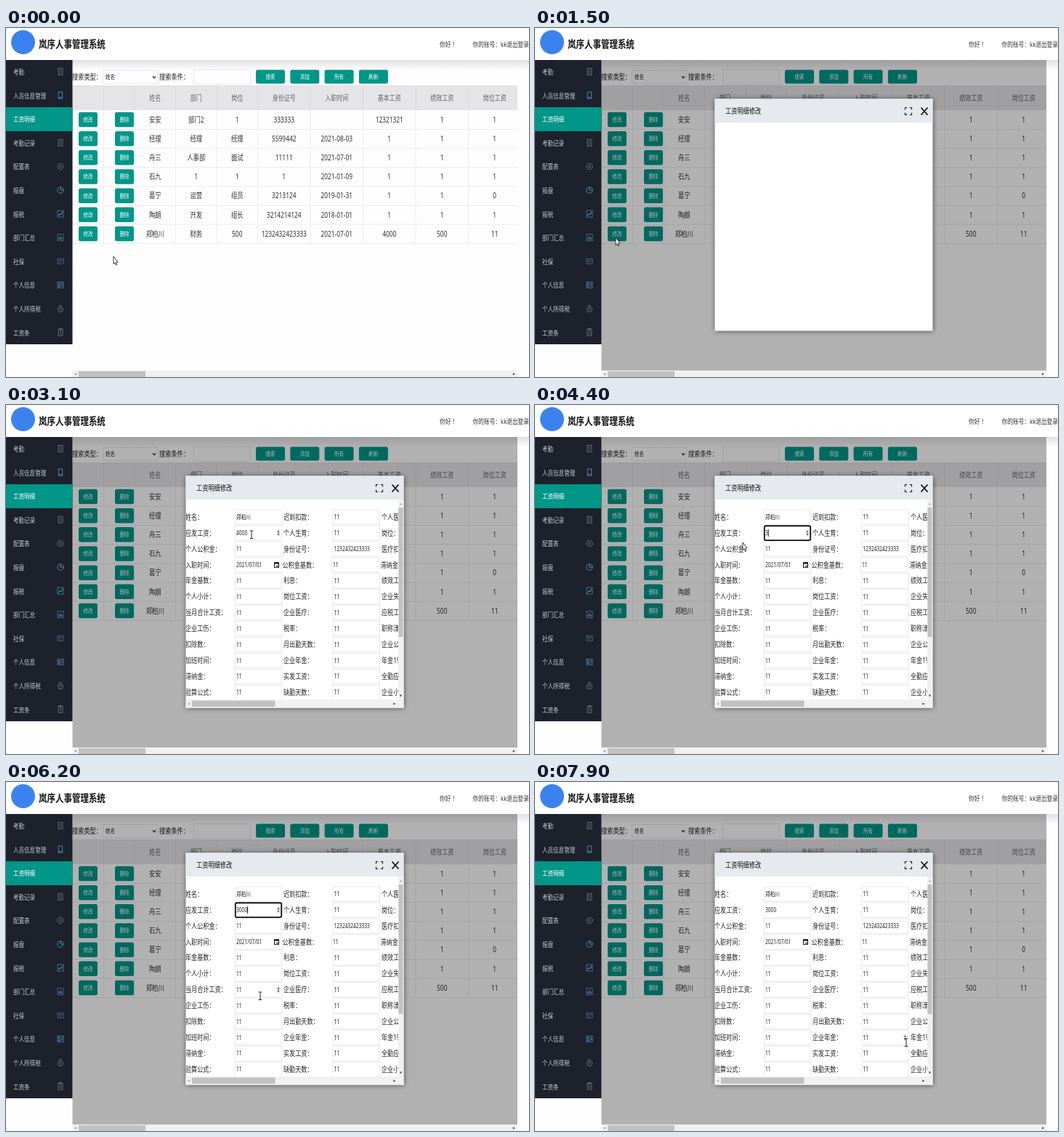
Animation, 720 px wide and 480 px high, one loop 8 s. Source, as an HTML page with a canvas:

```html
<!DOCTYPE html>
<html lang="zh-CN">
<head>
<meta charset="utf-8">
<title>人事管理</title>
<style>
html, body { margin: 0; width: 100%; height: 100%; overflow: hidden; background: #fff; }
canvas { display: block; width: 720px; height: 480px; }
</style>
</head>
<body>
<canvas id="stage" width="720" height="480"></canvas>
<script>
const ctx = document.getElementById('stage').getContext('2d');
const LOOP = 8000, STEP = 100;
const SQUEEZE = 0.82;
const TEAL = '#009688';
const FONT = '"Noto Sans", "Noto Sans CJK SC", "Noto Sans CJK", sans-serif';

const menu = ['考勤', '人员信息管理', '工资明细', '考勤记录', '配置表', '报盘',
  '报税', '部门汇总', '社保', '个人信息', '个人所得税', '工资条'];
const colX = [91.5, 134.5, 177, 233.5, 290, 346.5, 419, 491.5, 564, 636.5, 709];
const heads = ['姓名', '部门', '岗位', '身份证号', '入职时间', '基本工资', '绩效工资', '岗位工资'];
const staff = [
  '安安|部门2|1|333333||12321321|1|1',
  '经理|经理|经理|5599442|2021-08-03|1|1|1',
  '舟三|人事部|面试|11111|2021-07-01|1|1|1',
  '石九|1|1|1|2021-01-09|1|1|1',
  '葛宁|运营|组员|3213124|2019-01-31|1|1|0',
  '陶朗|开发|组长|3214214124|2018-01-01|1|1|1',
  '郑柏川|财务|500|1232432423333|2021-07-01|4000|500|11'
].map(r => r.split('|'));
const fields = [
  '姓名|迟到扣款|个人医疗', '应发工资|个人生育|岗位', '个人公积金|身份证号|医疗扣款',
  '入职时间|公积金基数|滞纳金额', '年金基数|利息|绩效工资', '个人小计|岗位工资|企业失业',
  '当月合计工资|企业医疗|应税工资', '企业工伤|税率|职称津贴', '扣除数|月出勤天数|企业公积金',
  '加班时间|企业年金|年金1%', '滞纳金|实发工资|全勤应发', '验算公式|缺勤天数|企业小计',
  '个人养老|企业生育|个人失业', '部门|企业养老|补贴', '加班工资|其他扣款|个人年金',
  '请假天数|工龄工资|奖金', '计税基数|备注|合计'
].map(r => r.split('|'));
const fieldX = [315, 449.5];
const ROW = 21.95, ROW0 = 154, MAX_SCROLL = 121;

const path = [
  [0, 148, 314], [300, 148, 314], [1100, 111, 288], [1900, 111, 288],
  [2900, 338, 178], [3400, 338, 178], [3900, 286, 189], [5400, 286, 189],
  [6100, 350, 294], [7350, 350, 294], [7850, 511, 358], [8000, 511, 358]
];
const typing = [[0, '4000'], [4250, '3'], [4650, '30'], [4900, '300'], [5150, '3000']];

function ease(t, a, b) {
  const k = Math.min(1, Math.max(0, (t - a) / (b - a)));
  return k * k * (3 - 2 * k);
}

function pointer(t) {
  let i = 1;
  while (path[i][0] < t) i++;
  const [t0, x0, y0] = path[i - 1], [t1, x1, y1] = path[i];
  const k = ease(t, t0, t1);
  return { x: x0 + (x1 - x0) * k, y: y0 + (y1 - y0) * k };
}

function text(s, x, cy, size, color, align = 'left', weight = 400) {
  ctx.save();
  ctx.translate(x, cy + size * 0.37);
  ctx.scale(SQUEEZE, 1);
  ctx.font = `${weight} ${size}px ${FONT}`;
  ctx.textAlign = align;
  ctx.fillStyle = color;
  ctx.fillText(s, 0, 0);
  ctx.restore();
}

function rect(x, y, w, h, color) {
  ctx.fillStyle = color;
  ctx.fillRect(x, y, w, h);
}

function box(x, y, w, h, color, lw = 1) {
  ctx.strokeStyle = color;
  ctx.lineWidth = lw;
  ctx.strokeRect(x, y, w, h);
}

function line(color, lw, ...pts) {
  ctx.beginPath();
  for (let i = 0; i < pts.length; i += 2) ctx.lineTo(pts[i], pts[i + 1]);
  ctx.strokeStyle = color;
  ctx.lineWidth = lw;
  ctx.stroke();
}

function shape(color, ...pts) {
  ctx.beginPath();
  for (let i = 0; i < pts.length; i += 2) ctx.lineTo(pts[i], pts[i + 1]);
  ctx.closePath();
  ctx.fillStyle = color;
  ctx.fill();
}

function ring(x, y, r, color, a = 0, b = Math.PI * 2) {
  ctx.beginPath();
  ctx.arc(x, y, r, a, b);
  ctx.strokeStyle = color;
  ctx.lineWidth = 0.9;
  ctx.stroke();
}

// dx, dy give the direction in which the arrow points
function arrow(x, y, dx, dy, r, color) {
  shape(color, x + dx * r, y + dy * r, x - dx * r + dy * r, y - dy * r + dx * r,
    x - dx * r - dy * r, y - dy * r - dx * r);
}

function button(label, x, cy, w, h) {
  ctx.beginPath();
  ctx.roundRect(x, cy - h / 2, w, h, 2.5);
  ctx.fillStyle = TEAL;
  ctx.fill();
  text(label, x + w / 2, cy, 8, '#fff', 'center', 500);
}

function docIcon(x, y, c) {
  box(x - 3, y - 4.5, 6, 9, c, 0.9);
  for (const d of [-2, 0, 2]) line(c, 0.8, x - 1.5, y + d, x + 1.5, y + d);
}

const icons = [
  docIcon,
  (x, y) => { box(x - 2.7, y - 4.5, 5.4, 9, '#4784a8'); line('#4784a8', 1, x - 2.7, y + 2.8, x + 2.7, y + 2.8); },
  (x, y) => { line('#3f7f92', 1, x - 2, y - 1.5, x, y + 0.5, x + 2, y - 1.5); line('#3f7f92', 1, x, y, x, y + 3); },
  docIcon,
  (x, y, c) => { ring(x, y, 4.2, c); ring(x, y, 1.6, c); },
  (x, y) => { ring(x, y, 4.2, '#528fb2'); line('#528fb2', 1, x, y - 4, x, y, x + 4, y); },
  (x, y) => { box(x - 4, y - 4.5, 8, 9, '#41789a', 0.9); line('#5ca4cc', 1, x - 3, y + 3, x - 1, y, x + 1, y + 1, x + 3, y - 3); },
  (x, y) => { box(x - 4, y - 4.5, 8, 9, '#41708d', 0.9); for (const d of [-2, 0, 2]) line('#5a93b3', 1, x + d, y + 3, x + d, y - 2 + Math.abs(d)); },
  (x, y) => { box(x - 4, y - 3.5, 8, 7, '#42687a', 0.9); line('#42687a', 1, x - 4, y - 1, x + 4, y - 1); line('#42687a', 1, x - 2, y + 1.2, x + 1, y + 1.2); },
  (x, y) => { box(x - 4, y - 4, 8, 8, '#4482a8', 0.9); ring(x - 1.6, y - 1, 1.1, '#62a5cc'); line('#62a5cc', 1, x - 3, y + 2, x, y + 2); line('#62a5cc', 1, x + 1, y - 1.5, x + 3, y - 1.5); line('#62a5cc', 1, x + 1, y + 1, x + 3, y + 1); },
  (x, y, c) => { ring(x, y + 1, 3.7, c); line(c, 1, x - 1.5, y - 4.5, x + 1.5, y - 4.5); line(c, 0.9, x - 1.5, y - 1, x, y + 1, x + 1.5, y - 1); line(c, 0.9, x, y + 1, x, y + 3); },
  (x, y, c) => { docIcon(x, y, c); rect(x - 1.5, y - 5.5, 3, 2, c); }
];

function sidebar() {
  rect(0, 44, 91.5, 391, '#1d212c');
  rect(0, 109, 91.5, 33, TEAL);
  menu.forEach((label, i) => {
    const y = 60.5 + i * 32.6;
    text(label, 10, y, 9.2, i === 2 ? '#fff' : '#c6c8cc');
    icons[i](75, y - 0.5, '#66747f');
  });
}

function topBar() {
  rect(0, 0, 720, 44, '#fff');
  const g = ctx.createLinearGradient(0, 44, 0, 58);
  g.addColorStop(0, 'rgba(40,30,60,.13)');
  g.addColorStop(1, 'rgba(40,30,60,0)');
  rect(91.5, 44, 628.5, 14, g);
  ctx.beginPath();
  ctx.arc(23.5, 19.5, 16.5, 0, Math.PI * 2);
  ctx.fillStyle = '#3b82f0';
  ctx.fill();
  text('岚序人事管理系统', 45, 22, 14, '#111', 'left', 700);
  text('你好 ！', 597, 22.5, 9.4, '#333');
  text('你的账号：kk退出登录', 720, 22.5, 9.4, '#333', 'right');
}

function searchRow() {
  text('搜索类型：', 91, 67, 10, '#222');
  box(133.5, 58.5, 75, 18, '#e8e6e9');
  text('姓名', 137, 67.5, 8, '#222');
  line('#222', 1.3, 202, 66.3, 204, 68.8, 206, 66.3);
  text('搜索条件：', 211, 67, 10, '#222');
  box(258.5, 57.5, 78, 20, '#e8e6e9');
  ['搜索', '添加', '所有', '刷新'].forEach((s, i) => button(s, 344 + i * 47.3, 67, 40, 19));
}

function table() {
  ctx.save();
  ctx.beginPath();
  ctx.rect(91, 78, 613, 220);
  ctx.clip();
  rect(91, 79.5, 613, 33.5, '#e5e4e6');
  for (const x of colX) {
    line('#d8d7da', 0.8, x, 80, x, 113);
    line('#e9e8eb', 0.8, x, 113, x, 297);
  }
  line('#dcdbde', 0.8, 91, 79.5, 704, 79.5);
  const mid = i => (colX[i + 2] + colX[i + 3]) / 2;
  heads.forEach((s, i) => text(s, mid(i), 96.5, 9.8, '#666', 'center'));
  staff.forEach((row, r) => {
    const y = 126 + r * 26.17;
    line('#e9e8eb', 0.9, 91, y + 13.3, 704, y + 13.3);
    button('修改', 100, y, 26, 20.5);
    button('删除', 150, y, 26, 20.5);
    row.forEach((s, i) => text(s, mid(i), y, 10.2, '#333', 'center'));
  });
  ctx.restore();
}

function pageScroll() {
  rect(91.5, 471, 612.5, 9, '#f0f0f1');
  rect(100, 472, 92, 8, '#c1c1c2');
  arrow(95.5, 476, -1, 0, 1.6, '#999');
  arrow(699.5, 476, 1, 0, 1.6, '#444');
}

function spinner(x, y) {
  rect(x - 3, y - 5, 6, 10, '#f0f0f0');
  arrow(x, y - 2.2, 0, -1, 1.5, '#555');
  arrow(x, y + 2.2, 0, 1, 1.5, '#555');
}

function hovered(p, scroll) {
  if (p.y < 131 || p.y > 405) return null;
  const row = Math.round((p.y + scroll - ROW0) / ROW);
  const col = fieldX.findIndex(x => p.x > x && p.x < x + 65);
  const dy = Math.abs(p.y + scroll - ROW0 - row * ROW);
  return col < 0 || row < 0 || row >= fields.length || dy > 10 ? null : { row, col };
}

function fieldValue(row, col, t) {
  if (row === 0 && col === 0) return staff[6][0];
  if (row === 1 && col === 0) return typing.filter(k => k[0] <= t).pop()[1];
  if (row === 2 && col === 1) return staff[6][3];
  if (row === 3 && col === 0) return '2021/07/01';
  return '11';
}

function calendar(x, y) {
  box(x - 3, y - 3, 6, 6.5, '#111', 1);
  rect(x - 3, y - 3.5, 6, 2.2, '#111');
  rect(x, y + 0.8, 2, 1.8, '#111');
}

function salaryFocus(t, y) {
  ctx.beginPath();
  ctx.roundRect(315.8, y - 9.7, 63.4, 19.8, 2);
  ctx.strokeStyle = '#111';
  ctx.lineWidth = 1.8;
  ctx.stroke();
  const key = typing.filter(k => k[0] <= t).pop();
  const picked = ease(t, 3400, 3900);
  if (key[0] === 0 && picked > 0) {
    const w = 15.5 * Math.min(1, picked * 1.6);
    rect(332 - w, y - 5.5, w, 11, '#2f78d7');
  }
  text(key[1], 317, y, 8.1, key[0] === 0 && picked > 0.6 ? '#fff' : '#222');
  if (key[0] && Math.floor((t - key[0]) / 500) % 2 === 0) {
    rect(317 + key[1].length * 3.8, y - 5, 0.9, 10, '#000');
  }
}

function form(t, scroll, hover) {
  ctx.save();
  ctx.beginPath();
  ctx.rect(247.5, 130, 292.5, 275);
  ctx.clip();
  fields.forEach((labels, r) => {
    const y = ROW0 + r * ROW - scroll;
    const shift = r === 3 ? -1.5 : 0;
    labels.forEach((s, c) => text(s + '：', [247, 382 + shift, 517 + shift][c], y, 9.9, '#222'));
    fieldX.forEach((fx, c) => {
      const x = fx + (c ? shift : 0);
      const focus = r === 1 && c === 0 && t >= 3400 && t < 7000;
      box(x + 0.5, y - 10, 64.5, 20, '#e6e5e8', 0.9);
      if (focus) salaryFocus(t, y);
      else text(fieldValue(r, c, t), x + 2, y, 8.1, '#222');
      const isText = (r === 0 && c === 0) || (r === 2 && c === 1) || (r === 3 && c === 0);
      const over = hover && hover.row === r && hover.col === c;
      if (!isText && (focus || over)) spinner(x + 60, y);
    });
    if (r === 3) calendar(372.5, y);
  });
  ctx.restore();

  rect(540, 130, 7.5, 275, '#f1f1f1');
  rect(540.5, 141 + 78 * scroll / MAX_SCROLL, 6, 178, '#c1c1c1');
  arrow(543.5, 136, 0, -1, 1.6, scroll > 1 ? '#444' : '#aaa');
  arrow(543.5, 400, 0, 1, 1.6, scroll > MAX_SCROLL - 1 ? '#aaa' : '#444');
  rect(247.5, 405, 300, 11.5, '#f1f1f1');
  rect(256, 406.5, 114.5, 8.5, '#c1c1c1');
  arrow(251.5, 411, -1, 0, 1.6, '#aaa');
  arrow(535, 411, 1, 0, 1.6, '#444');
}

function dialog(t, scroll, hover) {
  const k = ease(t, 1320, 1480);
  if (!k) return;
  rect(91.5, 44, 612.5, 427, 'rgba(0,0,0,.3)');
  ctx.save();
  ctx.globalAlpha = k;
  ctx.translate(397.5, 257);
  ctx.scale(0.5 + k / 2, 0.5 + k / 2);
  ctx.translate(-397.5, -257);
  ctx.save();
  ctx.shadowColor = 'rgba(0,0,0,.65)';
  ctx.shadowBlur = 7;
  rect(247.5, 97.5, 300, 319, '#fff');
  ctx.restore();
  rect(247.5, 97.5, 300, 32.5, '#e6e9ed');
  text('工资明细修改', 262, 114.5, 10, '#111', 'left', 500);
  for (const sx of [-1, 1]) for (const sy of [-1, 1]) {
    line('#222', 1.2, 514 + sx * 1.8, 114.5 + sy * 5, 514 + sx * 4.5, 114.5 + sy * 5, 514 + sx * 4.5, 114.5 + sy * 2);
  }
  line('#111', 1.8, 531.5, 109.5, 540.5, 119.5);
  line('#111', 1.8, 540.5, 109.5, 531.5, 119.5);
  if (t >= 1700) form(t, scroll, hover);
  ctx.restore();
}

function cursor(p, beam) {
  ctx.save();
  ctx.translate(p.x, p.y);
  if (beam) {
    line('#222', 1, 0, -4.5, 0, 5);
    for (const y of [-5, 5.5]) line('#222', 1, -2.3, y, 2.3, y);
  } else {
    const pts = [0, 0, 0, 10.5, 2, 8.7, 3.4, 12, 4.8, 11.3, 3.5, 8.1, 6, 7.9];
    shape('#fff', ...pts);
    line('#222', 0.9, ...pts, 0, 0);
  }
  ctx.restore();
}

function draw(t) {
  rect(0, 0, 720, 480, '#fefdfe');
  const p = pointer(t);
  const scroll = MAX_SCROLL * (ease(t, 6220, 6700) - ease(t, 7250, 7550));
  const hover = t >= 1700 ? hovered(p, scroll) : null;
  searchRow();
  table();
  topBar();
  sidebar();
  pageScroll();
  dialog(t, scroll, hover);
  cursor(p, hover);
}

function tick() {
  const now = performance.now() % LOOP;
  draw(Math.floor(now / STEP) * STEP);
  requestAnimationFrame(tick);
}
tick();
</script>
</body>
</html>
```
